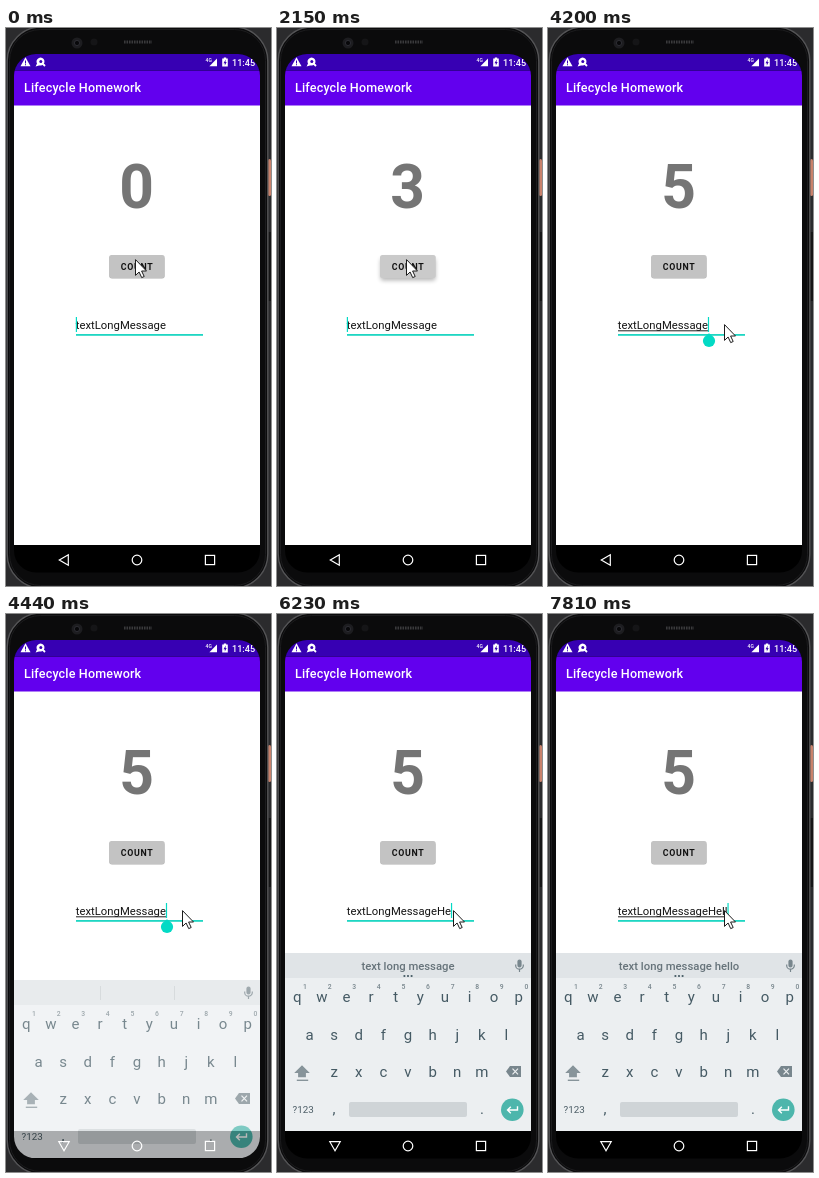
Recreate the animation shown at these times as an HTML page. Size 265x558 px, loop 8000 ms.

```html
<!DOCTYPE html>
<html lang="en">
<head>
<meta charset="utf-8">
<title>Counter app</title>
<style>
html, body { margin: 0; width: 100%; height: 100%; overflow: hidden; background: #2b2b2d; }
svg { display: block; width: 265px; height: 558px; font-family: Roboto, "Open Sans", sans-serif; }
.mid { text-anchor: middle; }
.med { font-weight: 500; }
.key { font-size: 15px; fill: #455a64; text-anchor: middle; }
.hint { font-size: 6.8px; fill: #78868d; font-weight: 500; text-anchor: middle; }
.line { fill: none; stroke: #fff; stroke-width: 1.2; }
</style>
</head>
<body>
<svg viewBox="0 0 265 558">
  <defs>
    <clipPath id="screen"><rect x="8" y="26" width="246" height="518.5" rx="22"/></clipPath>
    <filter id="blur" x="-20%" y="-40%" width="140%" height="190%"><feGaussianBlur id="soft" stdDeviation="1"/></filter>
  </defs>

  <!-- phone body -->
  <rect width="265" height="558" fill="#2b2b2d"/>
  <rect x="262" y="131" width="3" height="37" rx="1.5" fill="#c9826c"/>
  <rect x="262.5" y="204" width="2.5" height="69" fill="#161617"/>
  <rect x="1.2" y="-1" width="260.6" height="561" rx="34" fill="#0b0b0c" stroke="#545456" stroke-width="1.4"/>
  <rect x="3.5" y="1.5" width="256" height="556" rx="31" fill="none" stroke="#1c1c1e"/>
  <circle cx="71" cy="15" r="5.5" fill="#1d1d20"/>
  <circle cx="71" cy="15" r="2.6" fill="#08080a" stroke="#34343c" stroke-width=".8"/>
  <circle cx="88" cy="14" r="3.5" fill="#151517"/>
  <path d="M118 14H146" stroke="#3a3a3c" stroke-width="3" stroke-dasharray="1.6 .9"/>

  <g clip-path="url(#screen)">
    <rect x="8" y="26" width="246" height="519" fill="#000"/>
    <rect x="8" y="77" width="246" height="440" fill="#fff"/>
    <rect x="8" y="42.5" width="246" height="35" fill="#6200ee"/>
    <rect x="8" y="26" width="246" height="16.5" fill="#3700b3"/>
    <text class="med" x="18" y="64.3" font-size="12.55" letter-spacing=".157" fill="#fff">Lifecycle Homework</text>

    <!-- status bar -->
    <g fill="#fff">
      <path d="M19.5 29.3L24.5 38.3H14.5Z"/>
      <path d="M19.5 32.5V35.5M19.5 36.2V37.3" stroke="#3700b3" stroke-width="1"/>
      <path d="M29.6 38.4L31 35.6A4 4 0 1 1 35 37.6L33 37.4Z"/>
      <circle cx="34.8" cy="33.6" r="1.5" fill="#3700b3"/>
      <path d="M36 35L39 38" stroke="#fff" stroke-width="1.8"/>
      <text class="med" x="199.6" y="34" font-size="5">4G</text>
      <path d="M211 30.5V38.3H203.4Z"/>
      <path d="M217.8 29.6H220.2V30.5H221.8V38.4H216.2V30.5H217.8Z"/>
      <path d="M219.7 31.5L217.5 35.2H218.8V37.5L220.7 34H219.5Z" fill="#3700b3"/>
      <text class="med" x="226" y="37.7" font-size="9.1">11:45</text>
    </g>

    <text id="count" class="mid" x="130.7" y="179.8" font-size="60.5" font-weight="700" fill="#757575">0</text>

    <!-- button -->
    <rect id="shade" x="103.5" width="55" height="22" rx="2.5" filter="url(#blur)"/>
    <rect x="103" y="227" width="55.7" height="23" rx="2.5" fill="#c3c3c3"/>
    <rect id="glow" x="103" y="227" width="55.7" height="23" rx="2.5" fill="#fff"/>
    <text x="114.7" y="242.2" font-size="8.79" font-weight="700" letter-spacing=".7" fill="#111">COUNT</text>

    <!-- text field -->
    <rect x="70" y="306" width="127" height="1.8" fill="#1fd6c3"/>
    <text id="field" x="69.8" y="301" font-size="11.3" fill="#141414">textLongMessage</text>
    <rect id="under" x="70" y="302.3" height="1" fill="#202020"/>
    <rect id="caret" y="289" width="1.2" height="15" fill="#03dac5"/>
    <path id="handle" d="M161 305.3L165.4 308.7A6.1 6.1 0 1 1 156.6 308.7Z" fill="#03dac5"/>

    <!-- keyboard -->
    <g id="board">
      <rect x="8" y="339" width="246" height="178" fill="#eceff1"/>
      <rect x="8" y="339" width="246" height="25" fill="#e0e4e7"/>
      <path id="splits" d="M94.5 345V359M168.5 345V359" stroke="#c8cdd0"/>
      <text id="hintline" class="mid med" x="131" y="356" font-size="11.3" fill="#66737a"></text>
      <g id="dots" fill="#455a64"><circle cx="127.4" cy="362" r="1.1"/><circle cx="131" cy="362" r="1.1"/><circle cx="134.6" cy="362" r="1.1"/></g>
      <g stroke="#78868d" fill="none" stroke-width="1.2">
        <path d="M238.7 350.5V351.4A3.8 3.8 0 0 0 246.3 351.4V350.5M242.5 355V358"/>
        <rect x="241" y="346" width="3" height="7" rx="1.5" fill="#78868d"/>
      </g>
      <g id="keys"></g>
      <path d="M25 451.2L32.8 459H28.9V463.3H21.1V459H17.2Z" fill="#87949a"/>
      <rect x="19.8" y="465.6" width="11.4" height="1.4" fill="#87949a"/>
      <path d="M229 457.5L233 452H244V463H233Z" fill="#78868d"/>
      <path d="M235.5 454.7L241 460.3M241 454.7L235.5 460.3" stroke="#eceff1" stroke-width="1.2"/>
      <text x="15.5" y="499" font-size="9.8" fill="#4b5c65">?123</text>
      <text class="key" x="57" y="500">,</text>
      <text class="key" x="205" y="500">.</text>
      <rect x="72" y="488" width="118" height="15" rx="2" fill="#cfd4d7"/>
      <circle cx="235.3" cy="495.8" r="11.3" fill="#4db6ac"/>
      <path d="M240.5 492.3V496H230.5M233.8 492.7L230.5 496L233.8 499.3" fill="none" stroke="#fff" stroke-width="1.4"/>
    </g>

    <!-- navigation -->
    <path id="back" class="line" d="M53.3 532L62.3 526.8V537.2Z"/>
    <circle class="line" cx="131" cy="532" r="4.8"/>
    <rect class="line" x="199.4" y="527.4" width="9.2" height="9.2"/>
  </g>

  <path id="pointer" d="M.5 .6V16.4L4.1 13L6.7 18.6L9.2 17.5L6.6 12H11.5Z" fill="#fff" stroke="#1c1c1c" stroke-width="1"/>
</svg>
<script>
const LOOP = 8000;
const $ = id => document.getElementById(id);
const set = (id, attrs) => { for (const k in attrs) $(id).setAttribute(k, attrs[k]); };
const show = (id, on) => set(id, { visibility: on ? "visible" : "hidden" });

// Value of the last [time, value] step reached.
const at = (steps, t) => steps.reduce((v, s) => t >= s[0] ? s[1] : v, steps[0][1]);
// On/off signal that flips at each listed time.
const flips = (times, t) => times.filter(x => t >= x).length % 2 === 0;

const counts = [0, 420, 1030, 1710, 2390, 2910];
const lift = [[0, 0], [270, .5], [420, 1], [660, .5], [790, 0], [910, .5], [1030, 1], [1150, .5],
  [1290, 0], [1440, .5], [1560, 1], [1710, 0], [2150, 1], [2390, .5], [2640, 0], [2790, .6],
  [2910, 1], [3030, .4], [3160, 0]];
const blinks = [420, 910, 1290, 1710, 2270, 2640, 3160, 3700, 4980, 5370, 7560, 7810];
const typed = [[0, ""], [5660, "H"], [6230, "He"], [6500, "Hel"], [6760, "Hell"], [6910, "Hello"], [7810, "Hell"]];
const marked = [[0, 0], [4200, 1], [5660, 0], [5940, 1], [6230, 0], [6350, 1], [6500, 0], [7030, 1]];
const guess = "text long message";
const guesses = [[0, ""], [5940, guess], [6620, guess + " he"], [7030, guess + " hell"], [7310, guess + " hello"]];
const pointer = [[0, [129, 231]], [3030, [152, 260]], [3160, [183, 298]], [3310, [179, 308]],
  [3430, [177, 302]], [3550, [176, 298]], [3700, [176, 296]]];

function addKeys() {
  const label = (cls, x, y, s) => `<text class="${cls}" x="${x}" y="${y}">${s}</text>`;
  const rows = [["qwertyuiop", 20.3, 388], ["asdfghjkl", 32.6, 425.5], ["zxcvbnm", 57.2, 463]];
  let out = "";
  rows.forEach(([letters, x0, y], r) => [...letters].forEach((c, i) => {
    const x = x0 + 24.6 * i;
    out += label("key", x, y, c);
    if (r === 0) out += label("hint", x + 7.7, 374.5, (i + 1) % 10);
  }));
  $("keys").innerHTML = out;
}

function draw(t) {
  $("count").textContent = counts.filter(x => t >= x).length - 1;

  const up = at(lift, t);
  set("shade", { y: 228.5 + 2 * up, opacity: .32 - .04 * up });
  set("soft", { stdDeviation: .7 + 1.3 * up });
  set("glow", { opacity: .12 * up });

  const field = $("field");
  field.textContent = "textLongMessage" + at(typed, t);
  const width = field.getComputedTextLength();
  set("under", { width: width });
  show("under", at(marked, t));
  set("caret", { x: t < 4200 ? 69.8 : 69.8 + width });
  show("caret", flips(blinks, t));
  show("handle", t >= 4200 && t < 5660);

  const settled = t >= 4580;
  show("board", t >= 4440);
  set("board", { transform: `translate(0 ${settled ? 0 : 27})`, opacity: settled ? 1 : .72 });
  set("splits", { opacity: t < 5940 ? 1 : 0 });
  set("dots", { opacity: settled ? 1 : 0 });
  $("hintline").textContent = at(guesses, t);
  set("back", { transform: t >= 4320 ? "rotate(-90 58 532)" : "" });

  set("pointer", { transform: `translate(${at(pointer, t)})` });
}

addKeys();
const start = performance.now();
function frame() {
  draw((performance.now() - start) % LOOP);
  requestAnimationFrame(frame);
}
frame();
</script>
</body>
</html>
```
